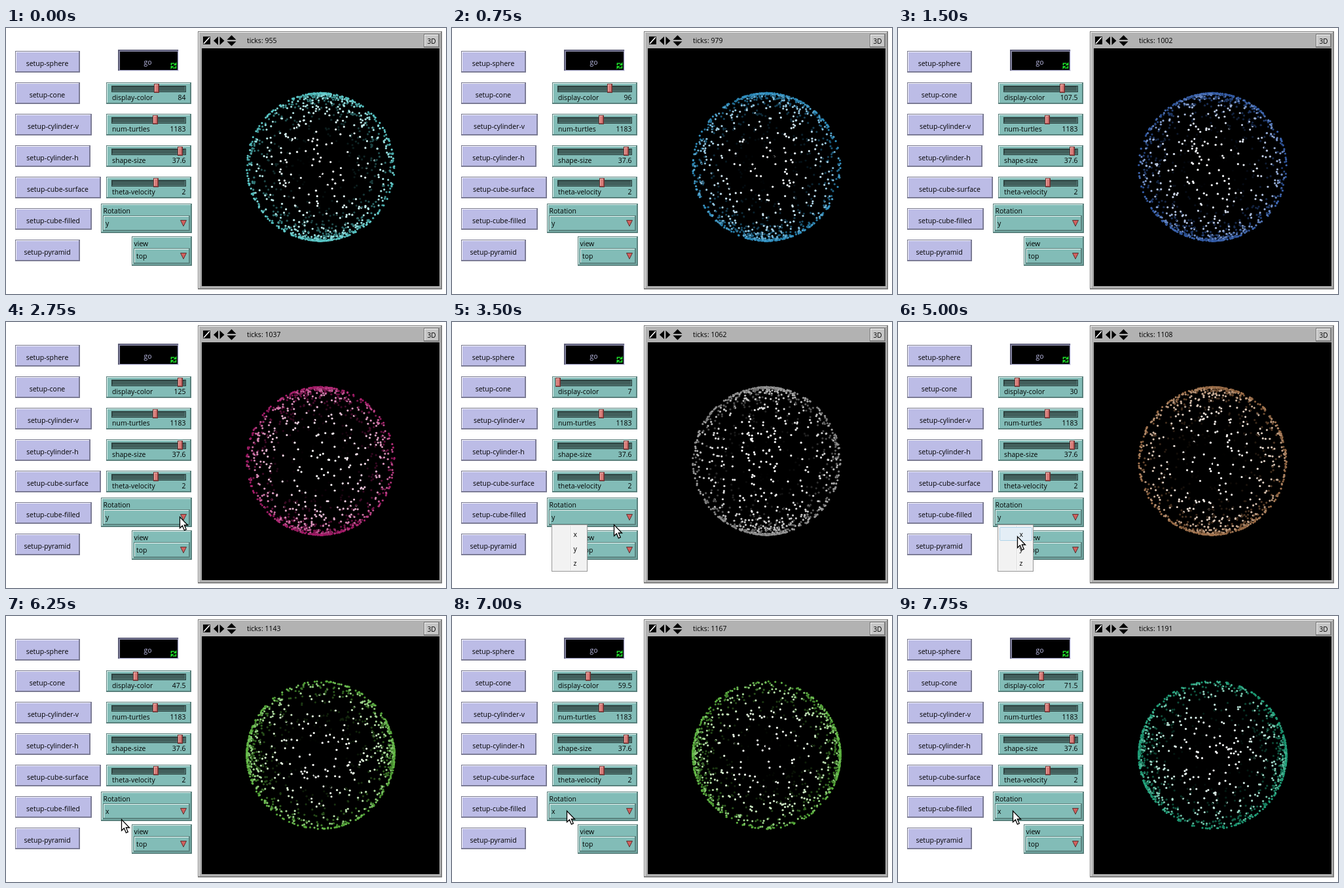
Animation of 672x406 px, one loop 8000 ms. Source, as an HTML page with a canvas:

```html
<!DOCTYPE html>
<html lang="en">
<head>
<meta charset="utf-8">
<title>Turning sphere model</title>
<style>
html, body { margin: 0; width: 672px; height: 406px; overflow: hidden; background: #fff; }
svg, canvas { position: absolute; display: block; }
svg { left: 0; top: 0; }
canvas { left: 299px; top: 31px; }
rect { shape-rendering: crispEdges; }
text { font: 10.5px "Open Sans", "Noto Sans", sans-serif; fill: #000; white-space: pre; }
</style>
</head>
<body>
<svg id="stage" width="672" height="406" viewBox="0 0 672 406"></svg>
<canvas id="view" width="363" height="363"></canvas>
<script>
const LOOP = 8000, STEP = 250, COUNT = 1183, RADIUS = 112.8;
const TEAL = '#82bcb7', LILAC = '#bcbce6';
const stage = document.getElementById('stage');
const ctx = document.getElementById('view').getContext('2d');

// ---- static markup helpers
const rect = (x, y, w, h, fill, extra = '') =>
  `<rect x="${x}" y="${y}" width="${w}" height="${h}" fill="${fill}" ${extra}/>`;
const label = (x, y, s, anchor = 'start', extra = '') =>
  `<text x="${x}" y="${y}" text-anchor="${anchor}" ${extra}>${s}</text>`;
const path = (d, fill, extra = '') => `<path d="${d}" fill="${fill}" ${extra}/>`;
const box = (x, y, w, h, edge, light, dark, fill) =>
  rect(x, y, w, h, edge) + rect(x + 1, y + 1, w - 2, h - 2, dark) +
  rect(x + 1, y + 1, w - 3, h - 3, light) + rect(x + 2, y + 2, w - 4, h - 4, fill);
const tealBox = (x, y, w, h) => box(x, y, w, h, '#567d79', '#eefaf8', '#5b8480', TEAL);

function button(name, row, w) {
  const y = 35 + row * 48;
  return box(14, y, w, 33, '#73738c', '#fff', '#83839f', LILAC) +
    label(14 + w / 2 - 0.5, y + 23, name, 'middle');
}

function slider(name, row, value, x, id) {
  const y = 83 + row * 48;
  return tealBox(153, y, 130, 33) +
    box(161, y + 5, 114, 10, '#2c413f', '#2f4543', '#56807c', '#425f5c') +
    `<g id="${id}-knob" transform="translate(${x} ${y + 2})">` +
    box(-4, 0, 8, 14, '#6b3030', '#f3b5b0', '#9c4a4a', '#d87a77') + '</g>' +
    label(162, y + 27, name) + label(274.5, y + 27, value, 'end', `id="${id}-value"`);
}

function chooser(name, x, y, value, id) {
  const w = 284 - x;
  return tealBox(x, y, w, 45) + label(x + 3.5, y + 15, name) +
    tealBox(x + 3, y + 18, w - 6, 24) +
    label(x + 7, y + 34, value, 'start', `id="${id}"`) +
    path(`M266.5 ${y + 25.5}h9l-4.5 9z`, '#d0605e', 'stroke="#5c3434"');
}

function viewPanel() {
  return box(293, 5, 373, 394, '#777', '#fff', '#8a8a8a', '#b2b2b2') +
    rect(299, 31, 363, 363, '#000') +
    rect(301, 13, 11, 12, '#000') + path('M302 24L311 14', 'none', 'stroke="#fff" stroke-width="1.6"') +
    path('M324 13v13l-7-6.5zM326.5 13v13l7-6.5zM337.5 18h14l-7-7zM337.5 20.5h14l-7 7z', '#000') +
    box(638, 9, 24, 21, '#777', '#f4f4f4', '#858585', '#c6c6c6') +
    label(650, 24, '3D', 'middle', 'style="font-size:10px"') +
    label(368, 23, '', 'start', 'id="ticks"');
}

function goButton() {
  return rect(171, 33, 93, 33, '#e6e6f4') + rect(171, 33, 92, 32, '#5e5e78') +
    rect(173, 35, 90, 30, '#9a9abb') + rect(174, 36, 88, 28, '#000') +
    label(216.5, 56, 'go', 'middle', `style="fill:${LILAC}"`) +
    path('M252.5 57v-3h5M259.5 58v3h-5', 'none', 'stroke="#1fe02b" stroke-width="1.7"') +
    path('M260.5 52v5h-5zM251.5 63v-5h5z', '#1fe02b');
}

function menu() {
  return '<g id="menu">' + rect(152, 309, 55, 72, '#979797') + rect(153, 310, 53, 70, '#f2f2f2') +
    rect(181, 311, 1, 68, '#dedede') + rect(182, 311, 1, 68, '#fff') +
    '<rect id="hover" x="155.5" y="313.5" width="49" height="20" rx="2" fill="#e4eef6" stroke="#b0d4ea"/>' +
    ['x', 'y', 'z'].map((s, i) => label(185.5, 328 + i * 22, s)).join('') + '</g>';
}

const buttons = [['setup-sphere', 99], ['setup-cone', 99], ['setup-cylinder-v', 117],
  ['setup-cylinder-h', 115], ['setup-cube-surface', 131], ['setup-cube-filled', 117], ['setup-pyramid', 99]];

stage.innerHTML = rect(0, 0, 672, 406, '#fff') +
  buttons.map(([s, w], i) => button(s, i, w)).join('') + goButton() +
  slider('display-color', 0, '', 230, 'color') + slider('num-turtles', 1, '1183', 228, 'num') +
  slider('shape-size', 2, '37.6', 266, 'size') + slider('theta-velocity', 3, '2', 229, 'speed') +
  chooser('Rotation', 145, 268, 'y', 'axis') + chooser('view', 192, 318, 'top', 'side') +
  viewPanel() + menu() +
  '<g id="cursor">' + path('M0 0v17l3.9-3.6 3 7 2.9-1.3-3-6.6h5.2z', '#fff', 'stroke="#000" stroke-width="1.3"') + '</g>';
const el = id => document.getElementById(id);

// ---- sphere points: even angles crowd towards the poles
let seed = 20117;
const random = () => {
  seed = (Math.imul(seed, 1664525) + 1013904223) >>> 0;
  return seed / 4294967296;
};
const dots = Array.from({ length: COUNT }, () => ({ phi: random() * Math.PI, theta: random() * 360 }));

// one base colour for each block of ten colour numbers
const HUES = [[141, 141, 141], [215, 50, 41], [241, 106, 21], [157, 110, 72], [237, 237, 49],
  [89, 176, 60], [44, 209, 59], [29, 159, 120], [84, 196, 196], [45, 141, 190],
  [52, 93, 169], [124, 80, 164], [167, 27, 106], [224, 127, 150]];

// black at the back, pure colour at the rim, white in front
const shade = (hue, z) =>
  `rgb(${hue.map(v => Math.round(z < 0 ? v * (1 + z) : v + (255 - v) * z))})`;

function drawSphere(tick, color, axis) {
  const hue = HUES[color > 47 && color < 50 ? 5 : Math.floor(color / 10)];
  ctx.fillStyle = '#000';
  ctx.fillRect(0, 0, 363, 363);
  for (const d of dots) {
    const a = (d.theta + 2 * tick) * Math.PI / 180;
    const ring = Math.sin(d.phi), pole = Math.cos(d.phi), side = ring * Math.sin(a);
    const [x, y] = axis === 'y' ? [side, pole] : [pole, side];
    ctx.fillStyle = shade(hue, ring * Math.cos(a));
    ctx.beginPath();
    ctx.arc(181.5 + x * RADIUS, 181.2 - y * RADIUS, 1.6, 0, 7);
    ctx.fill();
  }
}

// ---- timeline
const TICKS = [[0, 955], [1500, 1002], [2750, 1037], [4000, 1078], [5000, 1108], [6250, 1143], [7750, 1191]];
const POINTER = [[1750, 272, 410], [2500, 268, 303], [2750, 266, 297], [3250, 265, 298], [4000, 213, 330],
  [4500, 196, 328], [5000, 183, 327], [5500, 183, 326], [6250, 177, 310], [6750, 176, 297]];

function along(keys, t, col) {
  if (t <= keys[0][0]) return keys[0][col];
  const i = keys.findIndex(k => k[0] >= t);
  if (i < 0) return keys[keys.length - 1][col];
  const a = keys[i - 1], b = keys[i];
  return a[col] + (b[col] - a[col]) * (t - a[0]) / (b[0] - a[0]);
}

function render(t) {
  const tick = Math.round(along(TICKS, t, 1));
  const color = tick < 1058 ? 84 + (tick - 955) / 2 : 5 + (tick - 1058) / 2;
  const axis = t < 5500 ? 'y' : 'x';
  const px = Math.round(along(POINTER, t, 1)), py = Math.round(along(POINTER, t, 2));
  const open = t >= 3250 && t < 5500;

  el('ticks').textContent = 'ticks: ' + tick;
  el('color-value').textContent = color;
  el('color-knob').setAttribute('transform', `translate(${Math.round(169 + (color - 15) * 0.886)} 85)`);
  el('axis').textContent = axis;
  el('menu').style.display = open ? '' : 'none';
  el('hover').style.display = px < 207 ? '' : 'none';
  el('cursor').setAttribute('transform', `translate(${px - 0.5} ${py + 0.5})`);
  drawSphere(tick, color, axis);
}

const start = performance.now();
let shown = -1;
function frame() {
  const step = Math.floor((performance.now() - start) % LOOP / STEP);
  if (step !== shown) render((shown = step) * STEP);
  requestAnimationFrame(frame);
}
frame();
</script>
</body>
</html>
```
